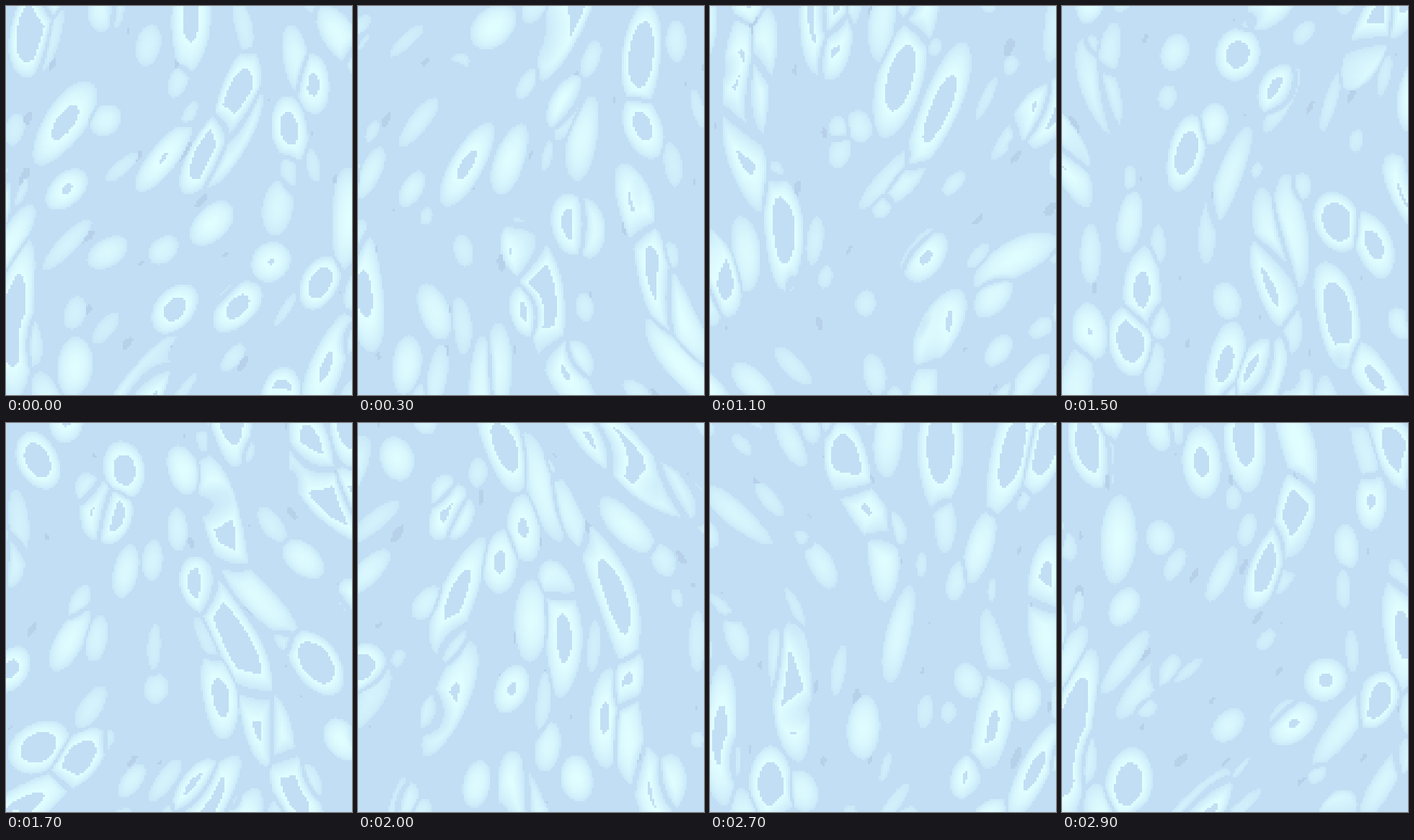
An HTML page with a canvas for the animation above (3 s loop, 480x540 px).

```html
<!DOCTYPE html>
<html lang="en">
<head>
<meta charset="utf-8">
<title>Drifting cells</title>
<style>
html, body { margin: 0; height: 100%; overflow: hidden; background: #c2def4; }
canvas { display: block; width: 480px; height: 540px; image-rendering: pixelated; }
</style>
</head>
<body>
<canvas id="stage" width="160" height="180"></canvas>
<script>
const PIXEL = 3, W = 160, H = 180;
const STEP = 100, STEPS = 30, LIFESPAN = 6;
const BACK = [194, 222, 244], EDGE = [200, 231, 248], CORE = [225, 254, 255], DARK = [183, 209, 234];

const ctx = document.getElementById('stage').getContext('2d');
const image = ctx.createImageData(W, H);
const mix = (a, b, t) => a + (b - a) * t;

function seeded(seed) {
  return () => {
    seed = (seed + 0x6d2b79f5) | 0;
    let t = Math.imul(seed ^ (seed >>> 15), 1 | seed);
    t ^= t + Math.imul(t ^ (t >>> 7), 61 | t);
    return ((t ^ (t >>> 14)) >>> 0) / 2 ** 32;
  };
}

// The direction in which neighbouring cells lie
function flow(x, y, phase) {
  return Math.PI / 2 + 0.45 * Math.sin(x / 130 + phase * 2) + 0.45 * Math.sin(y / 150 - x / 300 + phase * 3);
}

// One ellipse per grid square; each swells, shrinks and is reborn elsewhere
function scatter(step, phase, gapX, gapY, salt, shape) {
  const list = [];
  for (let y = -gapY; y < 540 + gapY; y += gapY) {
    for (let x = -gapX; x < 480 + gapX; x += gapX) {
      const key = salt + x * 7919 + y * 104729;
      const age = step / LIFESPAN + seeded(key)();
      const generation = Math.floor(age) % (STEPS / LIFESPAN);
      const random = seeded(key + (generation + 1) * 1299709);
      const cx = x + gapX * random(), cy = y + gapY * random();
      const angle = flow(cx, cy, phase) + 0.3 * (random() - 0.5);
      const life = Math.sin(Math.PI * (age % 1));
      list.push({ cx, cy, cos: Math.cos(angle), sin: Math.sin(angle), ...shape(life, random) });
    }
  }
  return list;
}

function lightCell(life, random) {
  const grow = life * random();
  const b = 4 + 27 * Math.sqrt(grow);
  return { a: b * (1.4 + 2.6 * random() ** 1.5), b, peak: 0.2 + 1.7 * grow };
}

function darkSpot(life, random) {
  const b = 1 + 6 * life * random();
  return { a: b * 2.4, b, peak: 1 };
}

function radius(c, x, y) {
  const dx = x - c.cx, dy = y - c.cy;
  return Math.hypot((dx * c.cos + dy * c.sin) / c.a, (dy * c.cos - dx * c.sin) / c.b);
}

// Where two cells meet, a gap opens between them
function level(cells, x, y) {
  let best = -9, second = -9;
  for (const c of cells) {
    const r = radius(c, x, y);
    if (r > 1.5) continue;
    const s = c.peak * (1 - r * r);
    if (s > best) [best, second] = [s, best];
    else if (s > second) second = s;
  }
  return best - Math.max(0, second + 0.25);
}

function colour(s, isDark) {
  if (s > 0 && s < 1) return EDGE.map((v, k) => mix(v, CORE[k], s ** 0.8));
  return s <= 0 && isDark ? DARK : BACK;
}

function draw(step) {
  const phase = step / STEPS * 2 * Math.PI;
  const cells = scatter(step, phase, 60, 90, 11, lightCell);
  const spots = scatter(step, phase, 96, 108, 57, darkSpot);
  for (let j = 0, p = 0; j < H; j++) {
    for (let i = 0; i < W; i++, p += 4) {
      const px = (i + 0.5) * PIXEL, py = (j + 0.5) * PIXEL;
      const x = px + 9 * Math.sin(py / 55 + px / 90 + phase * 2);
      const y = py + 6 * Math.sin(px / 40 - phase);
      const isDark = spots.some(c => radius(c, x, y) < 1);
      image.data.set([...colour(level(cells, x, y), isDark), 255], p);
    }
  }
  ctx.putImageData(image, 0, 0);
}

let shown = -1;
function tick() {
  const step = Math.floor(performance.now() / STEP) % STEPS;
  if (step !== shown) draw(shown = step);
  requestAnimationFrame(tick);
}
tick();
</script>
</body>
</html>
```
